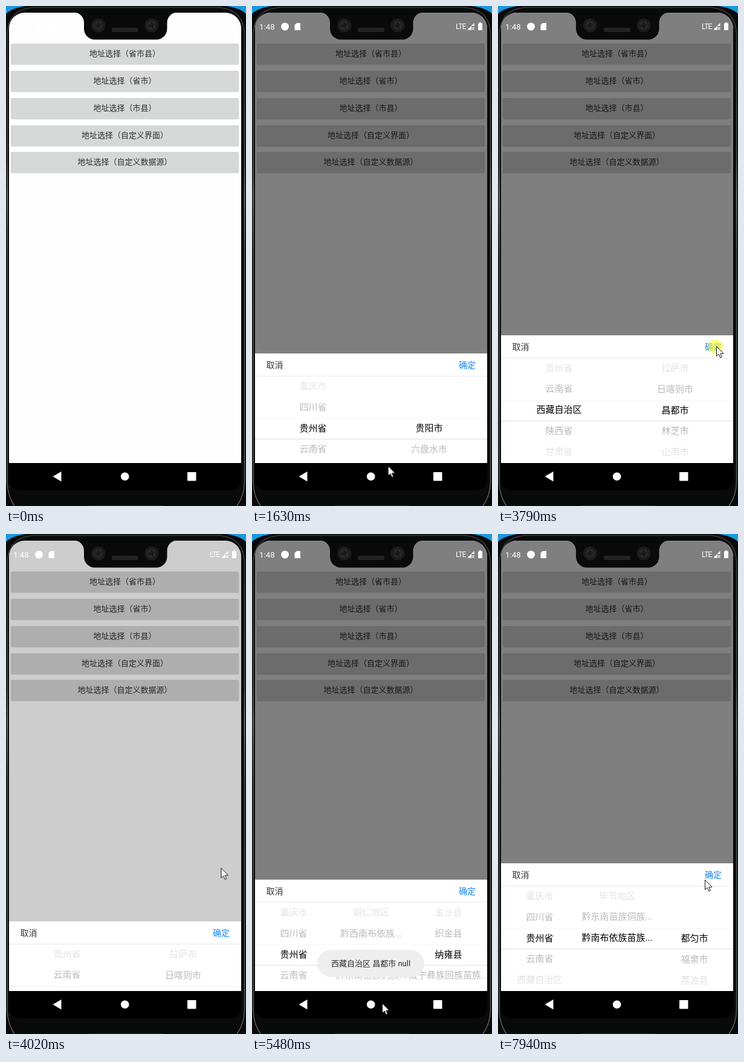
Recreate the animation shown at these times as an HTML page. Size 397 px wide and 826 px high, loop 8 s.

```html
<!DOCTYPE html>
<html lang="zh-CN">
<head>
<meta charset="utf-8">
<title>地址选择</title>
<style>
@property --i { syntax: "<number>"; inherits: false; initial-value: 0; }
* { box-sizing: border-box; margin: 0; padding: 0; }
html, body { width: 100%; height: 100%; overflow: hidden; background: #0a0a0b; }
body { position: relative; font: 13px Roboto, "Noto Sans CJK SC", "Noto Sans CJK", sans-serif; color: #2e2e2e; white-space: nowrap; }
svg { position: absolute; left: 0; top: 0; }
ul { list-style: none; }

/* every timed part shares one 8 s clock */
.dim, .panel, .ripple, .toast, .cursor, .press, .timed { animation: 8s linear infinite both; }

.screen { position: absolute; left: 5px; top: 11px; width: 384px; height: 744px; overflow: hidden; border-radius: 26px 26px 0 0; background: #fefefe; }
.btn { position: absolute; left: 3px; width: 377px; height: 34px; line-height: 34px; text-align: center; border-radius: 2px; background: #d6d8d7; box-shadow: 0 1px 1.5px #0003; top: calc(51.1px + var(--n) * 44.8px); }
.btn span { position: relative; }
.ripple { position: absolute; inset: 0; border-radius: 2px; background: #bbbdbc; }
.ripple.a { animation-name: rippleA; }
.ripple.b { animation-name: rippleB; }
.dim { position: absolute; inset: 0; background: #00000080; animation-name: dim; }

.panel { position: absolute; left: 0; bottom: 0; width: 384px; height: 211px; background: #fff; font-size: 15px; }
.panel.two { animation-name: panelA; }
.panel.three { animation-name: panelB; }
.head { height: 38px; line-height: 38px; padding: 0 19px 0 18.5px; display: flex; justify-content: space-between; font-size: 14px; color: #333; border-bottom: 1px solid #e9e9e9; }
.head b { font-weight: 400; color: #1485f5; }
.wheel { position: absolute; top: 37px; left: 0; width: 100%; height: 174px; display: flex; overflow: hidden; color: #000;
  --fade: #0001, #0000001c 17.4px, #00000048 52.2px, #00000055 69.6px, #000 69.6px, #000 104.4px, #00000055 104.4px, #00000048 121.8px, #0000001c 156.6px, #0001;
  -webkit-mask-image: linear-gradient(var(--fade)); mask-image: linear-gradient(var(--fade)); }
.col { position: relative; flex: 1; }
.list { position: absolute; top: 0; left: 0; width: 100%; transform: translateY(calc((2 - var(--i)) * 34.8px)); }
.list li { height: 34.8px; line-height: 34.8px; display: flex; justify-content: center; }
.rule { position: absolute; left: 0; width: 100%; height: 1px; }

.list.provinceA { animation-name: provinceA; }
.list.cityOld { animation-name: cityOld; }
.list.cityNew { animation-name: cityNew; }
.list.areaB { animation-name: areaB; }
.list.countyOld { animation-name: countyOld; }
.list.countyNew { animation-name: countyNew; }

.toast { position: absolute; left: 103px; top: 676px; width: 177px; height: 45px; line-height: 45px; border-radius: 22.5px; background: #eee; text-align: center; animation-name: toast; }
.cursor { position: absolute; left: 0; top: 0; animation-name: cursor; animation-timing-function: ease-in-out; }
.cursor svg { overflow: visible; }
.press { animation-name: press; animation-timing-function: step-end; }

@keyframes cursor {
  0% { transform: translate(359px, 825px); }
  10.5% { transform: translate(213px, 133px); }
  11.5%, 16% { transform: translate(213px, 126px); }
  21% { transform: translate(225px, 779px); }
  22.4% { transform: translate(228px, 724px); }
  23.5% { transform: translate(230px, 709px); }
  27.5%, 30% { transform: translate(233px, 640px); }
  32% { transform: translate(280px, 679px); }
  34.9%, 37.7% { transform: translate(296px, 691px); }
  41.5%, 43% { transform: translate(292px, 622px); }
  46%, 49% { transform: translate(361px, 562px); }
  58.5%, 64% { transform: translate(202px, 265px); }
  68.5% { transform: translate(215px, 775px); }
  69.8% { transform: translate(217px, 750px); }
  73%, 74.5% { transform: translate(220px, 646px); }
  79.5%, 82% { transform: translate(219px, 581px); }
  88.5%, 90.4% { transform: translate(204px, 622px); }
  99.2%, 100% { transform: translate(342px, 571px); }
}
@keyframes press {
  0%, 13.3%, 27.5%, 41.5%, 48.3%, 60.8%, 79%, 100% { opacity: 0; }
  11.8%, 23.5%, 37.7%, 46.5%, 59.3%, 74.5% { opacity: 1; }
}
@keyframes rippleA {
  0%, 12% { clip-path: circle(0 at 191px 17px); opacity: 1; }
  15.5% { clip-path: circle(183px at 191px 17px); opacity: 1; }
  16% { clip-path: circle(200px at 191px 17px); opacity: 1; }
  19%, 100% { clip-path: circle(200px at 191px 17px); opacity: 0; }
}
@keyframes rippleB {
  0%, 59.5% { clip-path: circle(0 at 191px 17px); opacity: 1; }
  62.75% { clip-path: circle(157.5px at 191px 17px); opacity: 1; }
  63.7% { clip-path: circle(200px at 191px 17px); opacity: 1; }
  67%, 100% { clip-path: circle(200px at 191px 17px); opacity: 0; }
}
@keyframes dim {
  0%, 13.5%, 51.5%, 63.2% { opacity: 0; }
  15.4%, 48.25%, 65.5%, 100% { opacity: 1; }
}
@keyframes panelA {
  0%, 51.5%, 100% { transform: translateY(212px); }
  16% { transform: translateY(212px); animation-timing-function: ease-out; }
  22.4% { transform: none; }
  48.25% { transform: none; animation-timing-function: ease-in; }
}
@keyframes panelB {
  0% { transform: translateY(212px); }
  64.5% { transform: translateY(212px); animation-timing-function: ease-out; }
  70.2%, 100% { transform: none; }
}
@keyframes toast {
  0%, 50.5%, 77%, 100% { opacity: 0; }
  52%, 75.5% { opacity: 1; }
}
@keyframes provinceA {
  0% { --i: 2; }
  23.5% { --i: 2; animation-timing-function: ease-in-out; }
  27.5% { --i: 3.8; }
  30% { --i: 3.885; }
  31.5%, 100% { --i: 4; }
}
@keyframes cityOld {
  0%, 31.5% { opacity: 1; }
  31.51%, 100% { opacity: 0; }
}
@keyframes cityNew {
  0%, 31.5% { opacity: 0; --i: 0; }
  31.51% { opacity: 1; }
  37.7% { --i: 0; animation-timing-function: ease-in-out; }
  41.5% { --i: 1.9; }
  43%, 100% { opacity: 1; --i: 2; }
}
@keyframes areaB {
  0% { --i: 2; }
  74.5% { --i: 2; animation-timing-function: ease-in-out; }
  79.5% { --i: 3.7; }
  81% { --i: 3.78; }
  83.5%, 100% { --i: 4; }
}
@keyframes countyOld {
  0%, 83.6% { opacity: 1; --i: 2; }
  83.61%, 100% { opacity: 0; --i: 2; }
}
@keyframes countyNew {
  0%, 83.6% { opacity: 0; }
  83.61%, 100% { opacity: 1; }
}
</style>
</head>
<body>
<!-- phone body -->
<svg width="397" height="826">
  <defs>
    <linearGradient id="edge" gradientUnits="userSpaceOnUse" x1="0" y1="0" x2="0" y2="826">
      <stop stop-color="#3a3a3c"/><stop offset=".3" stop-color="#555"/><stop offset=".38" stop-color="#8a8a8a"/>
      <stop offset=".5" stop-color="#555"/><stop offset="1" stop-color="#5a5a5a"/>
    </linearGradient>
  </defs>
  <rect width="397" height="826" fill="#0a0a0b"/>
  <path d="M0 0H34Q10 3 0 13ZM397 0H363Q387 3 397 13Z" fill="#1c98dc"/>
  <path d="M14 826Q2 808 2 785V46Q4 6 44 2.500H353Q393 6 394.500 46V785Q394.500 808 382 826" fill="none" stroke="url(#edge)" stroke-width="1.500"/>
  <path d="M5 755H389V780Q389 800 369 800H25Q5 800 5 780Z"/>
  <path d="M137 825.5H260" stroke="#252525"/>
</svg>

<div class="screen">
  <div class="btn" style="--n:0"><span>地址选择（省市县）</span></div>
  <div class="btn" style="--n:1"><i class="ripple a"></i><span>地址选择（省市）</span></div>
  <div class="btn" style="--n:2"><span>地址选择（市县）</span></div>
  <div class="btn" style="--n:3"><span>地址选择（自定义界面）</span></div>
  <div class="btn" style="--n:4"><i class="ripple b"></i><span>地址选择（自定义数据源）</span></div>
  <div class="dim"></div>

  <div class="panel two">
    <div class="head"><span>取消</span><b>确定</b></div>
    <i class="rule" style="top:107px;background:#f7f7f7"></i>
    <i class="rule" style="top:141px;background:#ddd"></i>
    <div class="wheel">
      <div class="col"><ul class="list timed provinceA"><li>重庆市<li>四川省<li>贵州省<li>云南省<li>西藏自治区<li>陕西省<li>甘肃省</ul></div>
      <div class="col">
        <ul class="list timed cityOld"><li>贵阳市<li>六盘水市<li>遵义市</ul>
        <ul class="list timed cityNew"><li>拉萨市<li>日喀则市<li>昌都市<li>林芝市<li>山南市</ul>
      </div>
    </div>
  </div>

  <div class="panel three">
    <div class="head"><span>取消</span><b>确定</b></div>
    <i class="rule" style="top:107px;background:#f7f7f7"></i>
    <i class="rule" style="top:141px;background:#ddd"></i>
    <div class="wheel">
      <div class="col"><ul class="list" style="--i:2"><li>重庆市<li>四川省<li>贵州省<li>云南省<li>西藏自治区</ul></div>
      <div class="col"><ul class="list timed areaB"><li>铜仁地区<li>黔西南布依族...<li>毕节地区<li>黔东南苗族侗族...<li>黔南布依族苗族...</ul></div>
      <div class="col">
        <ul class="list timed countyOld"><li>金沙县<li>织金县<li>纳雍县<li>威宁彝族回族苗族...<li>赫章县</ul>
        <ul class="list timed countyNew"><li>都匀市<li>福泉市<li>荔波县</ul>
      </div>
    </div>
  </div>
  <div class="toast">西藏自治区 昌都市 null</div>
</div>

<!-- status bar, notch, navigation -->
<svg width="397" height="826">
  <defs>
    <pattern id="grill" width="3" height="3" patternUnits="userSpaceOnUse"><path d="M0 3L3 0" stroke="#3d3d3d"/></pattern>
    <g id="lens">
      <circle r="11.5" fill="#1c1c1c"/><circle r="7.5" fill="#272625"/><circle r="4.5" fill="#1a1a1a"/>
      <path d="M-4 -3h2M2 -4h2M-3 4h2M3 2h2" stroke="#444"/>
    </g>
  </defs>
  <g fill="#fff">
    <text x="12" y="38.500" font-size="13.300">1:48</text>
    <circle cx="54.500" cy="34" r="6.500"/>
    <path d="M74 28H79Q80 28 80 29V39Q80 40 79 40H71.500Q70.500 40 70.500 39V31.500Z"/>
    <text x="337" y="38" font-size="12" letter-spacing="-.7">LTE</text>
    <path d="M367.500 28V33H363V39.500H356Z"/>
    <path d="M364 35l3.500 4.500m0-4.500l-3.500 4.500" stroke="#fff" stroke-width="1.200"/>
    <path d="M376 27H379V28.500H381V40H374V28.500H376Z"/>
    <path d="M77.500 777.200L91.500 769V785.400Z"/>
    <circle cx="196.700" cy="777.300" r="6.800"/>
    <rect x="300" y="770" width="14.500" height="14.500" rx="1"/>
  </g>
  <path d="M112 10.500A17 17 0 0 1 129 27.500V37.500A18 18 0 0 0 147 55.500H248.500A18 18 0 0 0 266.500 37.500V27.500A17 17 0 0 1 283.500 10.500Z" fill="#0a0a0b"/>
  <use href="#lens" x="152.500" y="32"/>
  <use href="#lens" x="241" y="32"/>
  <rect x="175" y="36" width="44" height="7" rx="2" fill="#161616"/>
  <rect x="175" y="36" width="44" height="7" rx="2" fill="url(#grill)"/>
</svg>

<div class="cursor">
  <svg width="14" height="22">
    <circle class="press" cx="-1" cy="1" r="12" fill="#fafa28" fill-opacity=".62"/>
    <path d="M.5 .5V16.500L4.200 13.200L6.700 19L9.300 17.900L6.800 12.200H12Z" fill="#fff" stroke="#111" stroke-linejoin="round"/>
  </svg>
</div>
</body>
</html>
```
